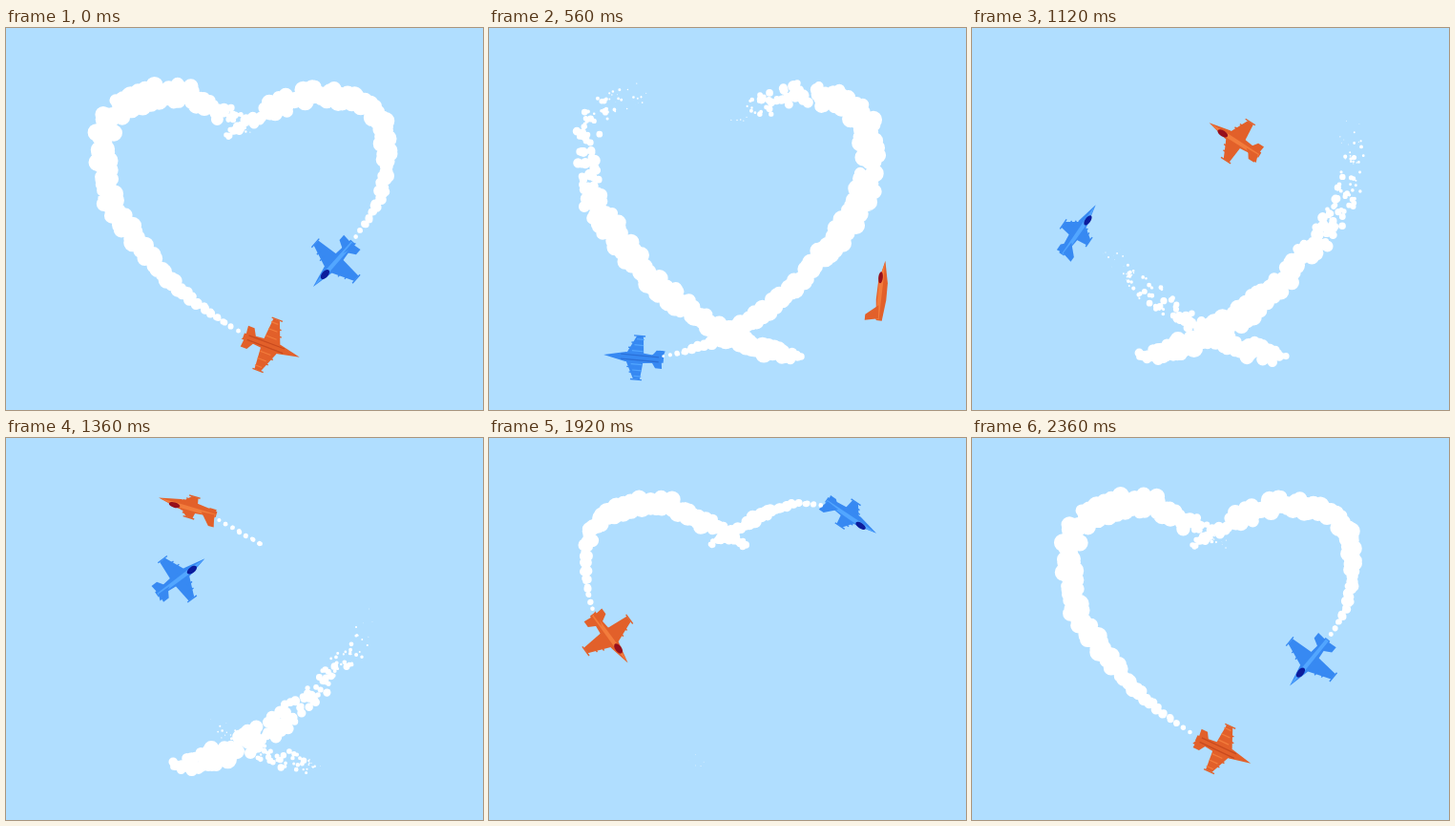
An HTML page with a canvas that plays this animation: 500x400 px, repeating every 2400 ms.

```html
<!DOCTYPE html>
<html lang="en">
<head>
<meta charset="utf-8">
<title>Two jets drawing a heart</title>
<style>
  html, body { margin: 0; width: 100%; height: 100%; overflow: hidden; background: #b0deff; }
  canvas { display: block; }
</style>
</head>
<body>
<canvas id="stage" width="500" height="400"></canvas>
<script>
const ctx = document.getElementById('stage').getContext('2d');
const LOOP = 2400, STEP = 40;
const SMOKE_START = 1150, SMOKE_END = 2545, PUFF_GAP = 20, TAIL_DELAY = 82;

// Flight of one jet, evenly spaced in time: x, y, roll in degrees.
// The other jet flies the mirror image, a little later.
const ROUTE = [
  [277, 333, 165], [347, 345, 219], [393, 322, 250], [412, 264, 275],
  [380, 200, 310], [318, 146, 331], [248, 100, 315], [178, 69, 290],
  [112, 90, 305], [105, 168, 332], [146, 234, 360], [204, 291, 455]
];

const clamp = (v, lo, hi) => Math.min(hi, Math.max(lo, v));
const wrap = t => ((t % LOOP) + LOOP) % LOOP;

function random(seed) {
  return () => {
    seed = (seed * 1664525 + 1013904223) % 4294967296;
    return seed / 4294967296;
  };
}

// Closed Catmull-Rom curve; the roll gains a full turn per loop
function fly(time) {
  const n = ROUTE.length, pos = time / LOOP * n, i = Math.floor(pos), u = pos - i;
  const key = (k, c) => {
    const lap = Math.floor(k / n);
    return ROUTE[k - lap * n][c] + (c === 2 ? 360 * lap : 0);
  };
  return [0, 1, 2].map(c => {
    const [a, b, d, e] = [-1, 0, 1, 2].map(k => key(i + k, c));
    return b + u / 2 * (d - a + u * (2 * a - 5 * b + 4 * d - e + u * (3 * (b - d) + e - a)));
  });
}

function makeSmoke(seed) {
  const rnd = random(seed), puffs = [];
  const count = Math.floor((SMOKE_END - SMOKE_START) / PUFF_GAP);
  for (let i = 0; i <= count; i++) {
    const time = SMOKE_START + i * PUFF_GAP;
    const [x, y] = fly(time);
    const scale = Math.min(1, 0.4 + 0.08 * i, 0.55 + 0.09 * (count - i));
    const dots = Array.from({ length: 5 }, () => {
      const angle = rnd() * 2 * Math.PI, reach = Math.sqrt(rnd());
      return {
        dx: Math.cos(angle) * reach, dy: Math.sin(angle) * reach,
        size: 0.7 + rnd() * 0.4, fade: 860 + rnd() * 110
      };
    });
    puffs.push({ x, y, scale, dots, born: time + TAIL_DELAY });
  }
  return puffs;
}

function drawSmoke(puffs, t) {
  ctx.fillStyle = '#fff';
  ctx.beginPath();
  for (const p of puffs) {
    const age = wrap(t - p.born);
    const spread = 15 * (1 - Math.exp(-age / 650)) * p.scale;
    const grown = (2 + 6.7 * clamp(age / 260, 0, 1)) * p.scale;
    for (const d of p.dots) {
      const r = (grown - Math.max(0, age - d.fade) / 60) * d.size;
      if (r <= 0) continue;
      const x = p.x + d.dx * spread, y = p.y + d.dy * spread;
      ctx.moveTo(x + r, y);
      ctx.arc(x, y, r, 0, 2 * Math.PI);
    }
  }
  ctx.fill();
}

function shape(color, points, sy = 1) {
  ctx.fillStyle = color;
  ctx.beginPath();
  points.forEach(([x, y]) => ctx.lineTo(x, y * sy));
  ctx.closePath();
  ctx.fill();
}

function bar(color, x1, x2, y, width) {
  ctx.strokeStyle = color;
  ctx.lineWidth = width;
  ctx.beginPath();
  ctx.moveTo(x1, y);
  ctx.lineTo(x2, y);
  ctx.stroke();
}

function drawJet({ main, light, dark, glass }, t) {
  const [x, y, degrees] = fly(t);
  const [x0, y0] = fly(t - 30), [x1, y1] = fly(t + 30);
  const roll = degrees * Math.PI / 180;
  const up = Math.cos(roll), lean = Math.sin(roll), top = up > -0.3;

  ctx.save();
  ctx.translate(x, y);
  ctx.rotate(Math.atan2(y1 - y0, x1 - x0));

  for (const side of [-1, 1]) {
    const sy = side * up;
    shape(main, [[10, 3], [0, 29], [-7, 29], [-9, 3]], sy);
    shape(main, [[-17, 3], [-22, 12], [-29, 12], [-28, 2]], sy);
    bar(main, 3, -9, 29.5 * sy, 1.4);
    for (const span of [13, 20]) {
      const edge = 11 - span * 0.4;
      bar(main, edge + 2, edge - 5, span * sy, 1.4);
    }
    if (!top) {
      for (const span of [9, 17, 25]) bar(light, 6 - span / 4, -8, span * sy, 1.2);
    }
  }

  const fin = () => shape(main, [[-14, 2], [-25, 15], [-31, 15], [-28, 1]], lean);
  const canopy = () => {
    ctx.fillStyle = glass;
    ctx.beginPath();
    ctx.ellipse(15, 3 * lean, 6, 2.3 + Math.abs(up), 0, 0, 2 * Math.PI);
    ctx.fill();
  };
  if (!top) {
    fin();
    if (up > -0.75) canopy();
  }
  shape(main, [[33, 0], [10, -5], [-8, -5.3], [-30, -3], [-30, 3], [-8, 5.3], [10, 5]]);
  if (top) {
    const ridge = 2 * lean;
    shape(light, [[31, 0], [14, ridge - 2.2], [-29, ridge - 1.8],
      [-29, ridge + 1.8], [14, ridge + 2.2]]);
    fin();
    canopy();
  } else {
    for (const offset of [-2.5, 2.5]) bar(dark, 15, -25, offset, 1.3);
  }
  ctx.restore();
}

const orange = {
  main: '#e2602a', light: '#f27c3c', dark: '#c94a1e', glass: '#96101c',
  smoke: makeSmoke(7), delay: 0
};
const blue = {
  main: '#3789f2', light: '#52a6ff', dark: '#2a70d8', glass: '#0c1c9c',
  smoke: makeSmoke(23), delay: 360
};

function draw(now) {
  const t = Math.floor(wrap(now) / STEP) * STEP;
  const blueTime = wrap(t - blue.delay);
  ctx.fillStyle = '#b0deff';
  ctx.fillRect(0, 0, 500, 400);

  ctx.save();
  ctx.translate(500, 0);
  ctx.scale(-1, 1);
  drawJet(blue, blueTime);
  drawSmoke(blue.smoke, blueTime);
  ctx.restore();

  drawSmoke(orange.smoke, t);
  drawJet(orange, t);
}

let origin = null;
function frame(now) {
  if (origin === null) origin = now;
  draw(Math.max(0, now - origin));
  requestAnimationFrame(frame);
}
draw(0);
requestAnimationFrame(frame);
</script>
</body>
</html>
```
